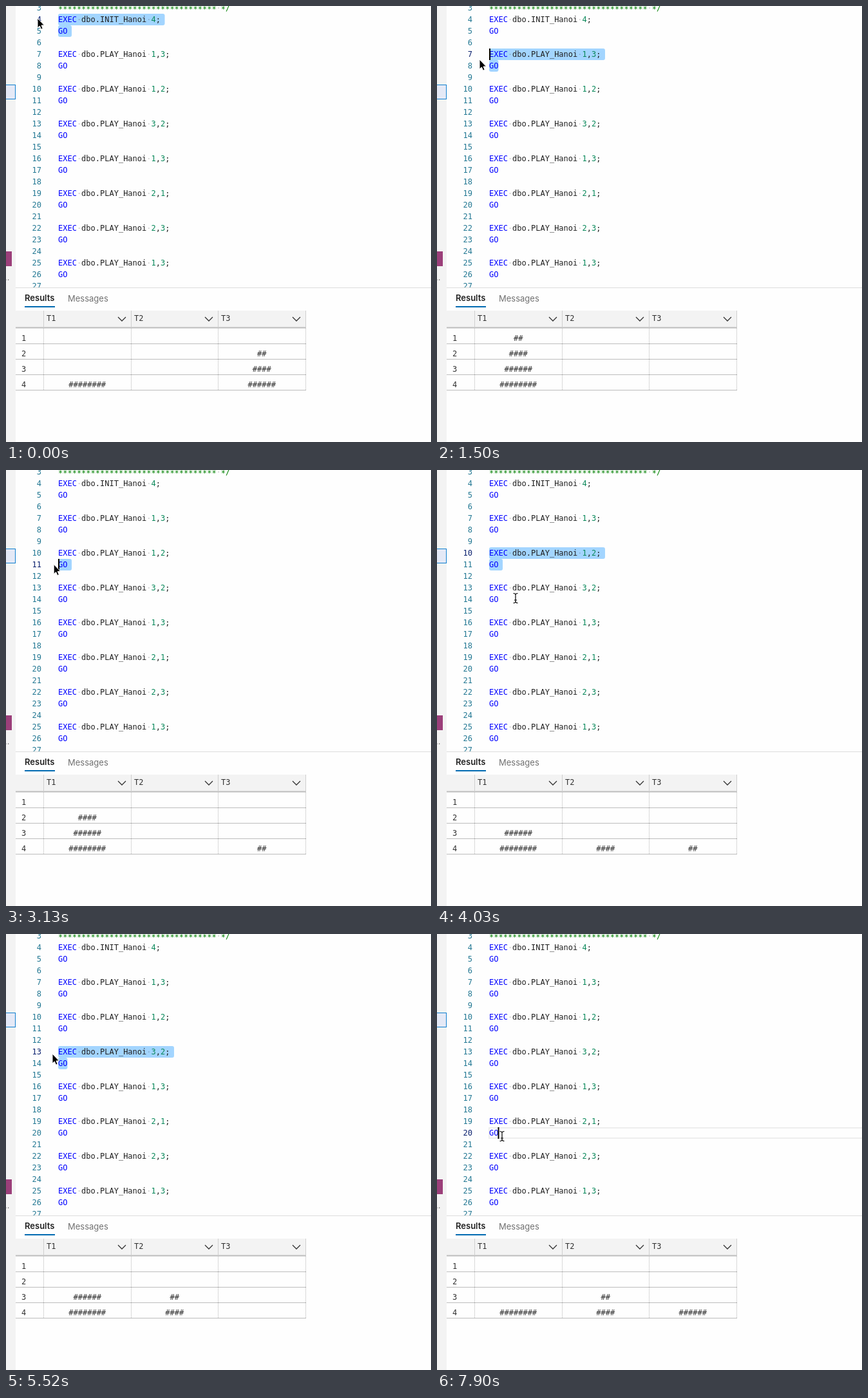
An HTML page for the animation above (8 s loop, 660x677 px).

```html
<!DOCTYPE html>
<html lang="en">
<head>
<meta charset="utf-8">
<title>Towers in SQL</title>
<style>
  html, body { margin: 0; width: 100%; height: 100%; overflow: hidden; background: #fefefe; }
  svg { display: block; }
  text { font: 12px "DejaVu Sans Mono", monospace; fill: #212121; white-space: pre; }
  .keyword { fill: #00f; }
  .number { fill: #09885a; }
  .comment { fill: #008000; }
  .space { fill: #333; opacity: .25; }
  .gutter { fill: #237893; text-anchor: end; }
  .gutter.active { fill: #0b216f; }
  .tab { font: 13px Inter, sans-serif; fill: #717171; }
  .tab.open { font-weight: 600; fill: #212121; }
  .cell { fill: #333; }
  .disc { fill: #333; text-anchor: middle; }
  .selection { fill: #a3d5ff; }
  .match { fill: #575757; opacity: .25; }
  .current { fill: none; stroke: #eee; stroke-width: 2; }
</style>
</head>
<body>
<svg width="660" height="677" viewBox="0 0 660 677">
  <rect width="15" height="677" fill="#f3f3f3"/>
  <rect x="-1" y="122.5" width="15.5" height="22" fill="#e4e9f6" stroke="#0f7fd0"/>
  <rect y="381" width="9" height="23" fill="#9b3f7a"/>
  <text class="tab" x="-2" y="426">..</text>

  <clipPath id="editor"><rect x="15" width="645" height="437"/></clipPath>
  <g clip-path="url(#editor)">
    <g id="marks"></g>
    <g id="code"></g>
    <rect id="caret" width="2" height="18"/>
  </g>

  <path d="M15 437.5H660" stroke="#dcdcdc"/>
  <text class="tab open" x="29" y="458">Results</text>
  <text class="tab" x="96" y="459">Messages</text>
  <path d="M29 467H76" stroke="#006ab1" stroke-width="2"/>

  <g id="grid">
    <rect x="15" y="473" width="451" height="26" fill="#f3f3f3"/>
    <g id="table"></g>
    <g id="discs"></g>
  </g>

  <g id="pointer">
    <path id="arrow" d="M0 -1V14L3.4 11L5.6 16.2L8.2 15.1L6 10H10.5Z" stroke="#fff" stroke-width="1"/>
    <g id="beam" fill="none">
      <path d="M-3.5 -7.5Q0 -7.5 0 -5Q0 -7.5 3.5 -7.5M0 -5V5M-3.5 7.5Q0 7.5 0 5Q0 7.5 3.5 7.5M-2 3H2" stroke="#fff" stroke-width="3"/>
      <path d="M-3.5 -7.5Q0 -7.5 0 -5Q0 -7.5 3.5 -7.5M0 -5V5M-3.5 7.5Q0 7.5 0 5Q0 7.5 3.5 7.5M-2 3H2" stroke="#000" stroke-width="1.2"/>
    </g>
  </g>
</svg>
<script>
const LOOP = 8000, TICK = 149.1;
const LEFT = 81, CHAR = 7.224, LINE = 18;
const COLUMNS = [58.5, 194.5, 329.5, 465.5];
const $ = id => document.getElementById(id);
const lineTop = line => 12 + (line - 4) * LINE;
const columnX = col => LEFT + col * CHAR;

const moves = ["1,3", "1,2", "3,2", "1,3", "2,1", "2,3", "1,3"];

// Caret and selection; a click on GO (col 2) marks its other occurrences shortly after.
const edits = [
  { t: -600, line: 4, selected: [4, 5], newline: true },
  { t: 900, line: 8, col: 2 },
  { t: 1200, line: 8, selected: [8] },
  { t: 1350, line: 7, selected: [7, 8] },
  { t: 2990, line: 12 },
  { t: 3130, line: 11, selected: [11], newline: true },
  { t: 3280, line: 10, selected: [10, 11], newline: true },
  { t: 4480, line: 14, col: 2 },
  { t: 4780, line: 14, selected: [14] },
  { t: 4930, line: 13, selected: [13, 14] },
  { t: 6270, line: 17, col: 2 },
  { t: 6570, line: 16, selected: [16, 17] },
  { t: 7900, line: 20, col: 2 }
];

// Disc sizes per tower from the bottom up; no towers while a query runs.
const results = [
  { t: 0, towers: ["4", "", "321"] },
  { t: 300 },
  { t: 450, towers: ["4321", "", ""] },
  { t: 1790 },
  { t: 1940, towers: ["432", "", "1"] },
  { t: 3580, towers: ["43", "2", "1"] },
  { t: 5370 },
  { t: 5520, towers: ["43", "21", ""] },
  { t: 6870 },
  { t: 7020, towers: ["4", "21", "3"] }
];

const pointerPath = [
  [0, 49, 20], [300, 49, 20], [900, 97, 96], [1050, 97, 96], [1350, 67, 85], [1500, 66, 84],
  [1940, 66, 84], [2240, 87, 107], [2550, 87, 107], [2990, 88, 165], [3280, 62, 132],
  [3730, 62, 132], [4030, 122, 199], [4330, 100, 203], [4630, 100, 203], [5080, 72, 187],
  [5530, 72, 187], [6120, 98, 257], [6420, 98, 257], [6570, 74, 241], [7160, 74, 241],
  [7310, 86, 272], [7475, 86, 272], [7900, 101, 314]
];

const text = (cls, x, y, content) => `<text class="${cls}" x="${x}" y="${y}">${content}</text>`;
const box = (cls, x, y, width, height, radius = 0) =>
  `<rect class="${cls}" x="${x}" y="${y}" width="${width}" height="${height}" rx="${radius}"/>`;
const latest = (list, now) => list.findLast(item => item.t <= now);

function call(line, name, args) {
  const y = lineTop(line) + 13, end = 9 + name.length;
  const colored = args.replace(/\d/g, '<tspan class="number">$&</tspan>');
  return text("keyword", LEFT, y, "EXEC") + text("space", columnX(4), y, "·") +
    text("", columnX(5), y, "dbo." + name) + text("space", columnX(end), y, "·") +
    text("", columnX(end + 1), y, colored + ";") +
    text("keyword", LEFT, y + LINE, "GO");
}

function buildEditor() {
  let code = text("comment", LEFT, 9, "*".repeat(34)) + text("space", columnX(34), 7, "·") +
    text("comment", columnX(35), 9, '*<tspan dy="-2">/</tspan>') + call(4, "INIT_Hanoi", "4");
  moves.forEach((args, i) => code += call(7 + 3 * i, "PLAY_Hanoi", args));
  for (let line = 3; line <= 27; line++) code += text("gutter", 55, lineTop(line) + 13, line);
  $("code").innerHTML = code;
}

function buildTable() {
  let table = '<path d="M15 499.5H466" stroke="#bdbdbd" stroke-width="2"/>';
  for (let row = 1; row <= 4; row++) {
    table += text("cell", 24, 496 + 24 * row, row) +
      `<path d="M15 ${500.5 + 24 * row}H466" stroke="#bdbdbd"/>`;
  }
  COLUMNS.forEach((x, i) => {
    table += `<path d="M${x} 473V499" stroke="#cfcfcf"/>
      <path d="M${x} 501V597" stroke="#b5b5b5" stroke-dasharray="1 1"/>`;
    if (i < 3) table += text("cell", x + 4.5, 489, "T" + (i + 1)) +
      `<path d="M${COLUMNS[i + 1] - 20.5} 483l6 6l6 -6" fill="none" stroke="#333" stroke-width="1.3"/>`;
  });
  $("table").innerHTML = table;
}

function drawEditor(now) {
  const { t, line, col = 0, selected = [], newline } = latest(edits, now);
  let marks = "";
  if (!selected.length) {
    marks += box("current", LEFT, lineTop(line) + 1, 600, LINE - 2);
    if (col && now - t > 140) {
      for (let go = 5; go <= 26; go += 3) marks += box("match", LEFT, lineTop(go), 2 * CHAR, LINE);
    }
  }
  for (const row of selected) {
    const isCall = row % 3 === 1;
    const chars = isCall ? (row === 4 ? 22 : 24) : 2;
    const tail = isCall || newline ? 6.6 : 0;
    marks += box("selection", LEFT, lineTop(row), chars * CHAR + tail, LINE, 3);
  }
  $("marks").innerHTML = marks;

  const caret = $("caret");
  caret.setAttribute("x", col ? 94.5 : LEFT);
  caret.setAttribute("y", lineTop(line));
  caret.style.display = (now - t) % 1000 < 500 ? "" : "none";
  document.querySelectorAll(".gutter").forEach(label =>
    label.classList.toggle("active", +label.textContent === line));
}

function drawResults(now) {
  const { towers } = latest(results, now);
  $("grid").style.display = towers ? "" : "none";
  if (!towers) return;
  $("discs").innerHTML = towers.map((tower, i) => [...tower].map((size, level) =>
    text("disc", (COLUMNS[i] + COLUMNS[i + 1]) / 2 - .3, 592 - 24 * level, "##".repeat(size))
  ).join("")).join("");
}

function drawPointer(now) {
  const next = pointerPath.findIndex(point => point[0] > now);
  const [t1, x1, y1] = pointerPath.at(next);
  const [t0, x0, y0] = next < 0 ? [0, x1, y1] : pointerPath[next - 1];
  const p = Math.min(1, (now - t0) / (t1 - t0));
  const eased = p * p * (3 - 2 * p);
  const x = x0 + (x1 - x0) * eased, y = y0 + (y1 - y0) * eased;
  $("pointer").setAttribute("transform", `translate(${x} ${y})`);
  $("arrow").style.display = x < 79 ? "" : "none";
  $("beam").style.display = x < 79 ? "none" : "";
}

let lastTick = -1;
function frame() {
  const tick = Math.floor((performance.now() % LOOP + 5) / TICK);
  if (tick !== lastTick) {
    const now = tick * TICK + 10;
    drawEditor(now);
    drawResults(now);
    drawPointer(now);
    lastTick = tick;
  }
  requestAnimationFrame(frame);
}

buildEditor();
buildTable();
frame();
</script>
</body>
</html>
```
